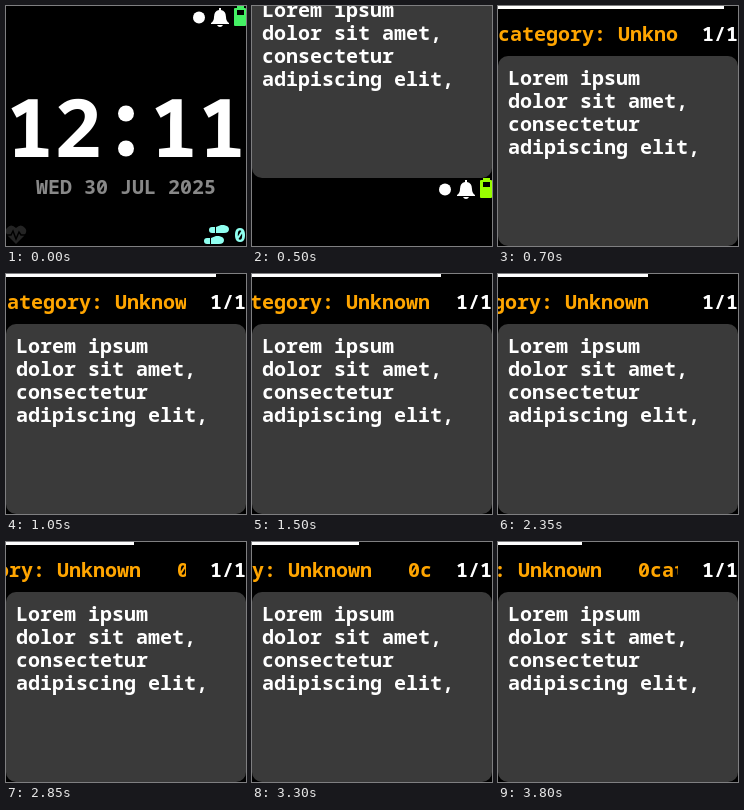
Animation of 240 by 240 pixels, one loop 3.85 s. Source, as an HTML page with a canvas:

```html
<!DOCTYPE html>
<html lang="en">
<head>
<meta charset="utf-8">
<title>Watch notification</title>
<style>
html, body { margin: 0; width: 100%; height: 100%; overflow: hidden; background: #000; }
canvas { display: block; width: 240px; height: 240px; }
</style>
</head>
<body>
<canvas id="stage" width="240" height="240"></canvas>
<script>
const ctx = document.getElementById('stage').getContext('2d');
const LOOP = 3850, STEP = 50;
const clamp = v => Math.max(0, Math.min(1, v));

function text(str, x, y, color, size = 20) {
  ctx.font = `bold ${size}px "Noto Sans Mono", "DejaVu Sans Mono", monospace`;
  ctx.fillStyle = color;
  ctx.fillText(str, x, y);
}

function rect(x, y, w, h, color, radius = 0) {
  ctx.fillStyle = color;
  ctx.beginPath();
  ctx.roundRect(x, y, w, h, radius);
  ctx.fill();
}

function dot(x, y, r, color) {
  ctx.fillStyle = color;
  ctx.beginPath();
  ctx.arc(x, y, r, 0, 7);
  ctx.fill();
}

function shape(path, color) {
  ctx.fillStyle = color;
  ctx.fill(new Path2D(path));
}

function shoe(x, y, color) {
  rect(x, y + 2, 6, 6, color, [3, 0, 0, 3]);
  shape(`M${x + 7} ${y + 2} L${x + 12} ${y} H${x + 15} Q${x + 20} ${y + 1} ${x + 20} ${y + 4}
    Q${x + 20} ${y + 8} ${x + 15} ${y + 8} H${x + 7}Z`, color);
}

function clockFace(t) {
  const battery = t < 50 ? '#44f064' : '#99ff00';
  const steps = t < 50 ? '#8ffff0' : '#99ffff';

  dot(193, 11.5, 6, '#fff');
  shape('M213 2 h2 v2 Q220 5 220 11 Q220 15 223 17 V18 H205 V17 Q208 15 208 11 Q208 5 213 4Z', '#fff');
  shape('M211 19 h6 q-1 2 -3 2 q-2 0 -3 -2Z', '#fff');
  rect(231, 0, 7, 3, battery);
  rect(228, 2, 12, 18, battery, 1);
  rect(231, 4, 7, 5, '#000');

  text('12', 0, 151, '#fff', 80);
  dot(120, 107.5, 8, '#fff');
  dot(120, 142.5, 8, '#fff');
  text('11', 144, 151, '#fff', 80);
  text('WED 30 JUL 2025', 30, 188, '#888');

  shape('M10 238 L2 230 Q-2 225 1 222 Q5 217 10 222 Q15 217 19 222 Q22 225 18 230Z', '#242424');
  ctx.strokeStyle = '#000';
  ctx.lineWidth = 1.5;
  ctx.stroke(new Path2D('M0 229 H5 L7 225 L10 233 L13 226 L15 229 H20'));

  shoe(203, 219, steps);
  shoe(198, 230, steps);
  text('0', 228, 236, steps);
}

function notification(t) {
  rect(0, 0, Math.round(210 - 0.0458 * (t - 1050)), 3, '#fff');

  ctx.save();
  ctx.beginPath();
  ctx.rect(0, 0, 180, 50);
  ctx.clip();
  const title = '0category: Unknown';
  const x = -Math.round(Math.max(0, t - 340) * 0.0324);
  for (const copy of [0, 252]) text(title, x + copy, 35, '#ffa500');
  ctx.restore();

  text('1/1', 204, 35, '#fff');
  rect(0, 50, 240, 190, '#3a3a3a', 10);
  ['Lorem ipsum', 'dolor sit amet,', 'consectetur', 'adipiscing elit,']
    .forEach((line, i) => text(line, 10, 79 + 23 * i, '#fff'));
}

function at(y, draw, t) {
  ctx.save();
  ctx.translate(0, y);
  draw(t);
  ctx.restore();
}

function frame() {
  const t = Math.floor(performance.now() % LOOP / STEP) * STEP;
  const slide = Math.round(240 * clamp((t - 357) / 200));
  ctx.fillStyle = '#000';
  ctx.fillRect(0, 0, 240, 240);
  if (slide < 240) at(slide, clockFace, t);
  if (slide > 0) at(slide - 240, notification, t);
  requestAnimationFrame(frame);
}
frame();
</script>
</body>
</html>
```
